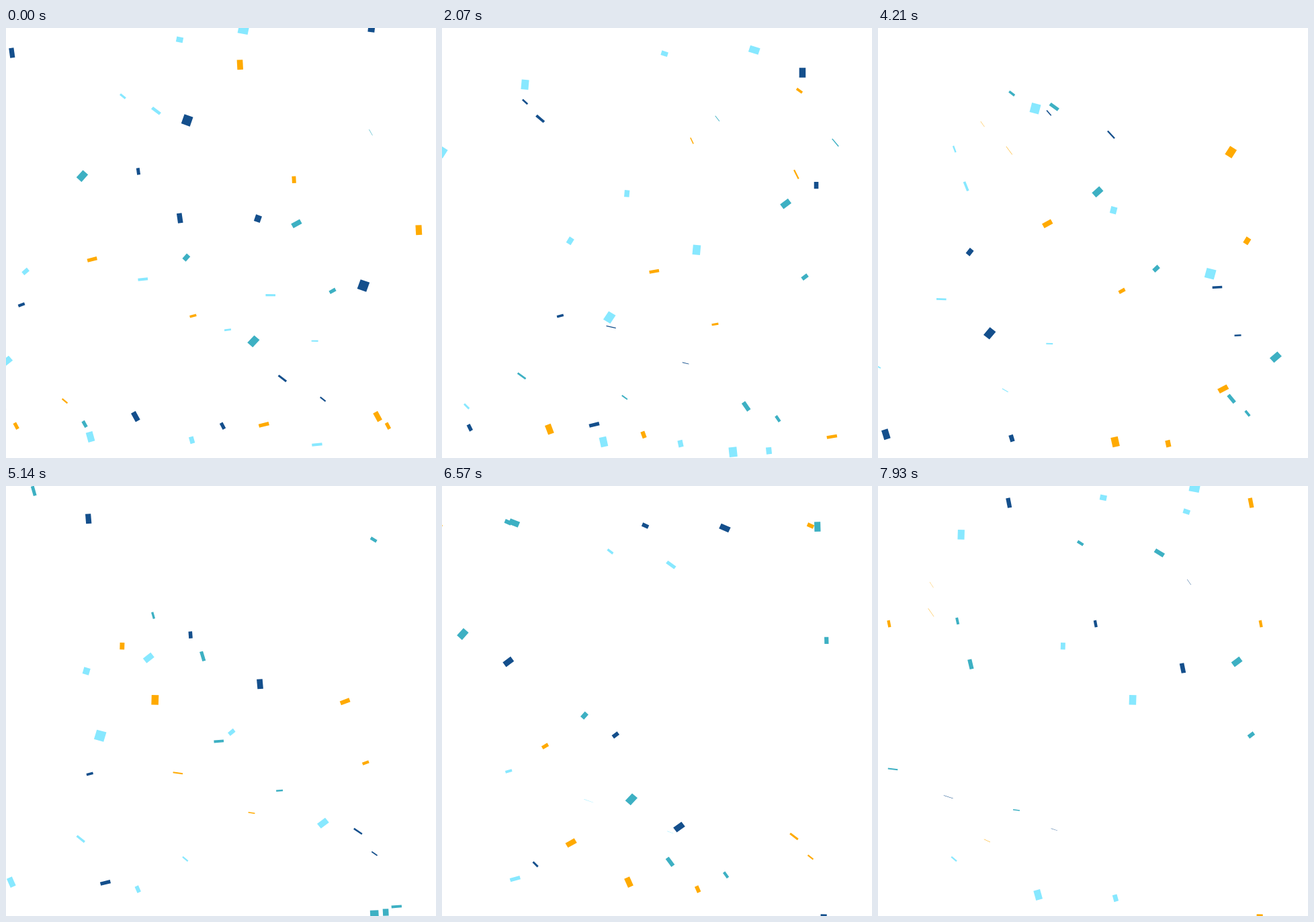
These frames come from a looping animation (640x640 px, 8000 ms). An HTML page with a canvas:

```html
<!DOCTYPE html>
<html lang="en">
<head>
<meta charset="utf-8">
<title>Falling confetti</title>
<style>
  html, body { margin: 0; width: 100%; height: 100%; overflow: hidden; background: #fff; }
  canvas { display: block; width: 100vmin; height: 100vmin; }
</style>
</head>
<body>
<canvas id="stage" width="640" height="640"></canvas>
<script>
const ctx = document.getElementById('stage').getContext('2d');
const LOOP = 8000, DISPLAY_RATE = 14, MOTION_RATE = 25;
const PERIOD = 300, LAST_AGE = 152;
const PIECE_LENGTH = 14.6, THINNEST = 0.4;

// Pieces drop down evenly spaced columns: [column, age in motion steps at the loop's start]
const columnX = column => 10.5 + 37.53 * column;
const drops = {
  '#144f8c': [[0, 31], [14, -16], [7, 48], [-6, 79], [11, 115], [5, 130], [-2, -46], [3, -96]],
  '#87e8ff': [[3, -13], [0, 4], [6, 88], [11, 92], [-6, 67], [3, 138], [6, -61], [-3, -83]],
  '#ffaa00': [[9, 34], [4, 83], [-4, 116], [-7, 130], [14.6, 130], [7.2, -32], [14, -50], [-1, -92]],
  '#3db0c3': [[3.2, 62], [14, 17], [12, 74], [-3, 129], [9, -40], [1, -103], [14.6, -130], [5, -199]]
};

// The same shower is shown three times: [scale x, scale y, left, top]
const copies = [[1.0475, 1, 249.5, 246], [1, 1, 0, 0], [0.6825, 0.6998, 190.9, 187.5]];

// Keyframes shared by every piece: [age, value]
const fall = [[-40, -445], [0, -147], [109.4, 500], [150, 653.5]];
const sway = [[-33, 1], [0, -36.5], [37, 0.6], [85, -32.5], [114, -12], [203, 73]];
const flip = [[-14, 12], [15.5, 0], [46, 14.2], [105, 0], [146, 12.5]];

const linear = u => u;
const easeInOut = u => (1 - Math.cos(Math.PI * u)) / 2;

function valueAt(keys, age, ease) {
  let i = 1;
  while (i < keys.length - 1 && keys[i][0] < age) i++;
  const [t0, v0] = keys[i - 1], [t1, v1] = keys[i];
  return v0 + (v1 - v0) * ease((age - t0) / (t1 - t0));
}

function drawPiece(column, age) {
  if (age > LAST_AGE) age -= PERIOD;
  if (age < -20) return;
  const width = Math.max(THINNEST, valueAt(flip, age, linear));
  ctx.save();
  ctx.translate(columnX(column) + valueAt(sway, age, easeInOut), valueAt(fall, age, linear));
  ctx.rotate((1.61 * age - 58) * Math.PI / 180);
  ctx.fillRect(-width / 2, -PIECE_LENGTH / 2, width, PIECE_LENGTH);
  ctx.restore();
}

function draw(ms) {
  const shown = Math.floor((ms + 5) * DISPLAY_RATE / 1000);
  const step = Math.ceil(shown * MOTION_RATE / DISPLAY_RATE);
  ctx.setTransform(1, 0, 0, 1, 0, 0);
  ctx.fillStyle = '#fff';
  ctx.fillRect(0, 0, 640, 640);
  for (const copy of copies) {
    const [scaleX, scaleY, left, top] = copy;
    ctx.setTransform(scaleX, 0, 0, scaleY, left, top);
    for (const [color, list] of Object.entries(drops)) {
      ctx.fillStyle = color;
      for (const [column, start] of list) drawPiece(column, start + step + 0.1);
    }
  }
}

const begin = performance.now();
function tick() {
  draw((performance.now() - begin) % LOOP);
  requestAnimationFrame(tick);
}
tick();
</script>
</body>
</html>
```
